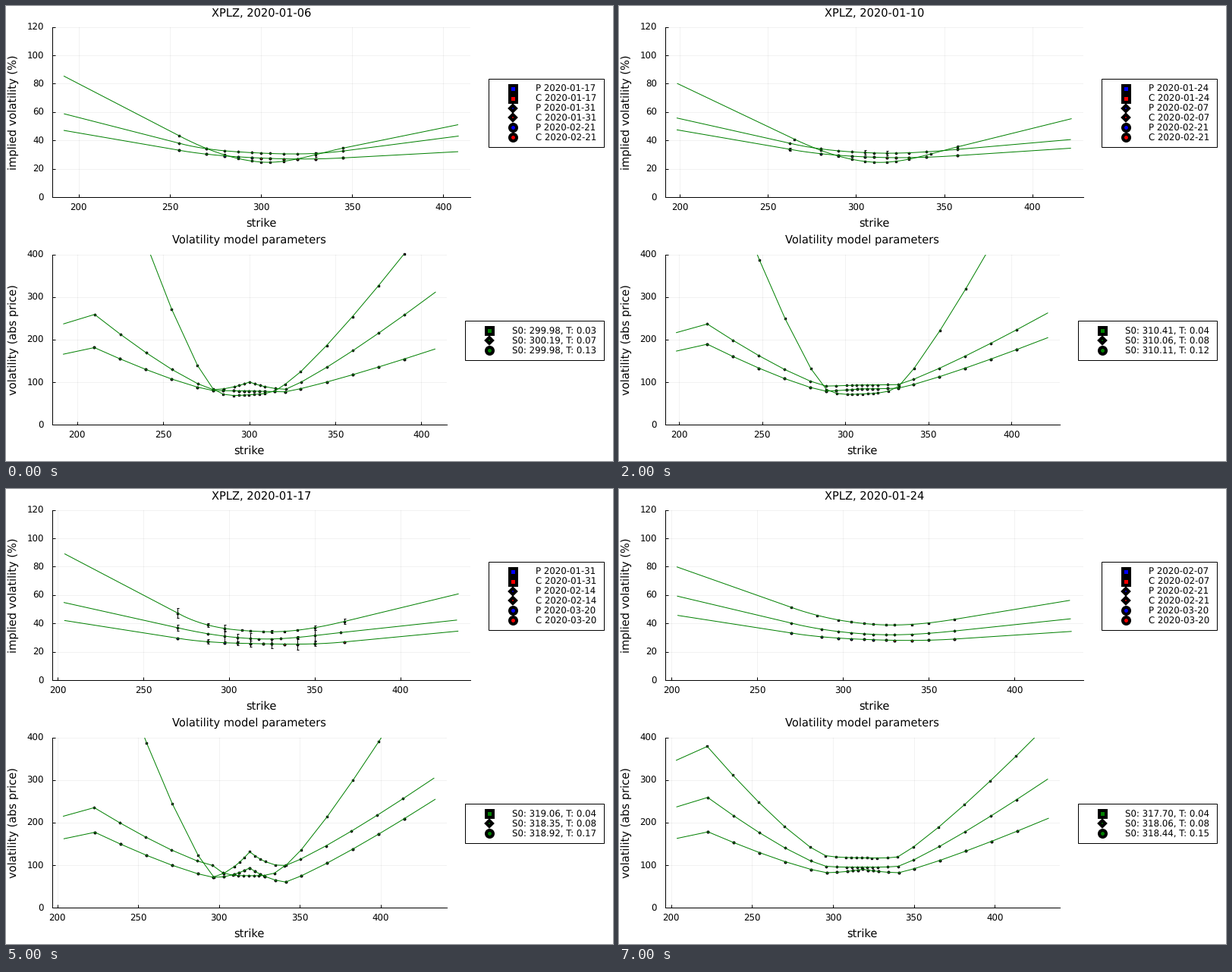
Write a matplotlib script that moves like this. It is 800 px wide and 600 px high and loops after 8000 ms.

```python
import numpy as np
import matplotlib.pyplot as plt
from matplotlib.animation import FuncAnimation
from matplotlib.patches import Rectangle

W, H = 800, 600
PX = 0.72  # points per pixel at 100 dpi
TICKER = "XPLZ"
BIG, SMALL = 14.6, 11.75
plt.rcParams.update({"font.family": "DejaVu Sans", "text.hinting": "none"})

# Grids in moneyness (strike / spot)
LOW_Z, HIGH_Z = 0.64, 1.36
SMILE_Z = np.array([LOW_Z, .85, 1, 1.15, HIGH_Z])
KNOTS = np.r_[.7:.91:.05, .93:.98:.02, .98:1.025:.01, 1.03:1.08:.02, 1.1:1.31:.05]
STEPS = np.array([.02, .04, .067, .1, .15])
QUOTE_Z = np.r_[1 - STEPS[::-1], 1, 1 + STEPS]

# Marker shape, plot size, legend size
MARKS = [("s", 2.9, 9), ("D", 2.0, 6.2), ("o", 2.7, 9)]


def day(date, spread, terms, spots, smiles, models):
    """Quotes of one day: days to expiry, spot and key values per expiry.

    smiles: volatility at SMILE_Z
    models: level at moneyness .7, .93, 1, 1.07 and 1.3
    """
    return dict(date=np.datetime64(f"2020-{date}"), spread=spread, terms=terms,
                spots=np.array(spots), smiles=np.array(smiles),
                models=np.array(models))


def between(a, b, date, terms):
    mean = [(a[k] + b[k]) / 2 for k in ("spots", "smiles", "models")]
    return day(date, (a["spread"] + b["spread"]) / 2, terms, *mean)


jan06 = day("01-06", .3, (11, 25, 46), (299.98, 300.19, 299.98),
            [(85.3, 43.3, 24.7, 34.5, 51),
             (58.7, 37.9, 31, 32.5, 43),
             (47, 33, 27.5, 27.6, 32)],
            [(784, 84, 70, 95, 401),
             (259, 82, 100, 83, 258),
             (181, 80, 79, 77, 154)])
jan08 = day("01-08", .8, (16, 30, 44), (303.62, 303.54, 303.14),
            [(75.7, 39.2, 22.7, 32.8, 49.3),
             (53, 36, 28.8, 30, 33.6),
             (48.3, 33, 27.1, 27.8, 33.6)],
            [(675, 74, 64, 87, 420),
             (221, 88, 80, 86, 156),
             (203, 72, 81, 79, 175)])
jan13 = day("01-13", .3, (11, 25, 46), (317.20, 316.59, 317.07),
            [(84.5, 43.8, 26.4, 37.6, 61.2),
             (58.5, 39.2, 33.4, 37, 47.5),
             (46.5, 33.8, 29.1, 30.5, 35.3)],
            [(735, 91, 80, 93, 645),
             (252, 93, 106, 102, 290),
             (175, 85, 87, 92, 178)])
jan15 = day("01-15", 0, (16, 30, 65), (311.79, 311.29, 311.85),
            [(70.5, 46.5, 38.4, 43.3, 57.5),
             (56.8, 38.3, 32.8, 36, 44.2),
             (41.8, 31.3, 28.1, 28.4, 32.2)],
            [(310, 109, 118, 115, 364),
             (242, 88, 99, 101, 243),
             (149, 76, 87, 84, 153)])
jan17 = day("01-17", 1.8, (14, 28, 63), (319.06, 318.35, 318.92),
            [(89, 46.5, 34.2, 41.2, 60.8),
             (54.7, 36.7, 29, 33.6, 42.3),
             (42, 29.3, 25.6, 26.8, 34.5)],
            [(715, 72, 131, 99, 485),
             (235, 99, 75, 98, 256),
             (177, 71, 93, 60, 209)])
jan24 = day("01-24", 0, (14, 28, 56), (317.70, 318.06, 318.44),
            [(79.8, 51.2, 39.3, 42.9, 56.2),
             (59.2, 40, 32.2, 34.7, 43.2),
             (45.6, 33, 28.4, 29, 34.3)],
            [(379, 122, 117, 119, 356),
             (259, 97, 95, 97, 254),
             (178, 82, 90, 82, 180)])
jan10 = between(jan08, jan13, "01-10", (14, 28, 42))
jan22 = between(jan17, jan24, "01-22", (16, 30, 58))
DAYS = [jan06, jan08, jan10, jan13, jan15, jan17, jan22, jan24]

fig = plt.figure(figsize=(W / 100, H / 100), dpi=100, facecolor="white")


def smile(y, z):
    """Straight wings joined by a smooth cubic core."""
    x = SMILE_Z
    rise = np.diff(y) / np.diff(x)
    m = np.array([rise[0], rise[0], (y[3] - y[1]) / (x[3] - x[1]),
                  rise[3], rise[3]])
    i = np.clip(np.searchsorted(x, z, side="right") - 1, 0, 3)
    h = x[i + 1] - x[i]
    t = (z - x[i]) / h
    return ((1 + 2 * t) * (1 - t) ** 2 * y[i] + t * (1 - t) ** 2 * h * m[i]
            + t * t * (3 - 2 * t) * y[i + 1] + t * t * (t - 1) * h * m[i + 1])


def model(keys, z):
    """Bending wings around a core with a sharp hump or a flat valley."""
    left, near, mid, far, right = keys
    u = np.clip(np.abs(z - 1) / .07, 0, 1)
    lift = mid - (near + far) / 2
    bump = (1 - u) ** 1.8 if lift > 0 else 1 - u ** 4
    return (np.interp(z, [.93, 1.07], [near, far]) + lift * bump
            + (left - near) * np.clip((.93 - z) / .23, 0, None) ** 1.25
            + (right - far) * np.clip((z - 1.07) / .23, 0, None) ** 1.15)


def write(stage, x, y, s, size=SMALL, **kw):
    stage.text(x, y, s, fontsize=size * PX, va="baseline", color="black", **kw)


def dots(ax, x, y, shape, size, edge, color, **kw):
    ax.plot(x, y, ls="", marker=shape, ms=size * PX, mew=edge * PX,
            mec="black", mfc=color, **kw)


def panel(stage, right, top, low, high, ymax, step, title, ylabel):
    left, bottom = 60.9, top + 224.2
    ax = fig.add_axes([left / W, 1 - bottom / H, (right - left) / W,
                       (bottom - top) / H])
    pad = 0.03 * (high - low)
    x0, x1 = low - pad, high + pad
    ax.set(xlim=(x0, x1), ylim=(0, ymax), facecolor="none")
    xticks, yticks = np.arange(200, x1, 50), np.arange(0, ymax + 1, step)
    ax.set_xticks(xticks, [])
    ax.set_yticks(yticks, [])
    ax.tick_params(direction="in", length=4 * PX, width=PX)
    ax.grid(color="black", alpha=0.05, lw=PX)
    ax.set_axisbelow(True)
    for side in ax.spines:
        ax.spines[side].set_visible(side in ("left", "bottom"))
        ax.spines[side].set_linewidth(PX)

    for k in xticks:
        x = left + (k - x0) / (x1 - x0) * (right - left)
        write(stage, x, bottom + 17.9, f"{k:.0f}", ha="center")
    for v in yticks:
        y = bottom - v / ymax * (bottom - top)
        write(stage, 50, y + 4.5, f"{v:.0f}", ha="right")
    middle = (left + right) / 2
    write(stage, middle, top - 14.4, title, BIG, ha="center")
    write(stage, middle, bottom + 38.4, "strike", BIG, ha="center")
    write(stage, 13.5, (top + bottom) / 2, ylabel, BIG, ha="center",
          rotation=90, rotation_mode="anchor")
    return ax


def legend(stage, left, top, xmark, xtext, rows):
    stage.add_patch(Rectangle((left, top), 787.6 - left, 12.9 * (len(rows) + 1),
                              fc="white", ec="black", lw=PX))
    for n, (kind, color, label) in enumerate(rows):
        y = top + 0.2 + 12.9 * (n + 1)
        shape, _, size = MARKS[kind]
        dots(stage, [xmark], [y], shape, size, 4, color)
        write(stage, xtext, y + 4.2, label)


def draw_smiles(ax, d, rng):
    z = np.linspace(LOW_Z, HIGH_Z, 200)
    for (shape, size, _), spot, keys in zip(MARKS, d["spots"], d["smiles"]):
        k = np.round(QUOTE_Z * spot / 2.5) * 2.5
        v = smile(keys, k / spot)
        put = k < spot
        dots(ax, k[put], v[put], shape, size, 1.4, "blue", zorder=3)
        dots(ax, k[~put], v[~put], shape, size, 1.4, "red", zorder=3)
        ax.plot(z * spot, smile(keys, z), color="green", lw=PX, zorder=4)

        half = d["spread"] * rng.exponential(size=len(k))
        wide = half > 1
        ax.errorbar(k[wide], v[wide], half[wide], ls="", ecolor="black",
                    elinewidth=PX, capsize=1.5 * PX, capthick=PX, zorder=3)


def draw_models(ax, d):
    for (shape, size, _), spot, keys in zip(MARKS, d["spots"], d["models"]):
        v = model(keys, KNOTS)
        seen = v < 402
        dots(ax, spot * KNOTS[seen], v[seen], shape, size, 1.4, "green",
             zorder=3, clip_on=False)
        ends = v[0] * LOW_Z / KNOTS[0], model(keys, HIGH_Z)
        ax.plot(spot * np.r_[LOW_Z, KNOTS, HIGH_Z], np.r_[ends[0], v, ends[1]],
                color="green", lw=PX, zorder=4)


def draw(i):
    d = DAYS[i]
    fig.clear()
    stage = fig.add_axes([0, 0, 1, 1])
    stage.set(xlim=(0, W), ylim=(H, 0))
    stage.axis("off")

    low, high = LOW_Z * min(d["spots"]), HIGH_Z * max(d["spots"])
    top = panel(stage, 611.7, 27.7, low, high, 120, 20,
                f"{TICKER}, {d['date']}", "implied volatility (%)")
    draw_smiles(top, d, np.random.default_rng(i))
    low_panel = panel(stage, 580.7, 327.7, low, high, 400, 100,
                      "Volatility model parameters", "volatility (abs price)")
    draw_models(low_panel, d)

    quotes = [(n, color, f"{side} {d['date'] + term}")
              for n, term in enumerate(d["terms"])
              for side, color in (("P", "blue"), ("C", "red"))]
    fits = [(n, "green", f"S0: {spot:.2f}, T: {term / 365:.2f}")
            for n, (spot, term) in enumerate(zip(d["spots"], d["terms"]))]
    legend(stage, 635.6, 95.6, 668, 698, quotes)
    legend(stage, 604.6, 415.3, 637, 667.4, fits)
    return []


anim = FuncAnimation(fig, draw, frames=len(DAYS), interval=1000, repeat=True,
                     repeat_delay=0, blit=False)
plt.show()
```
